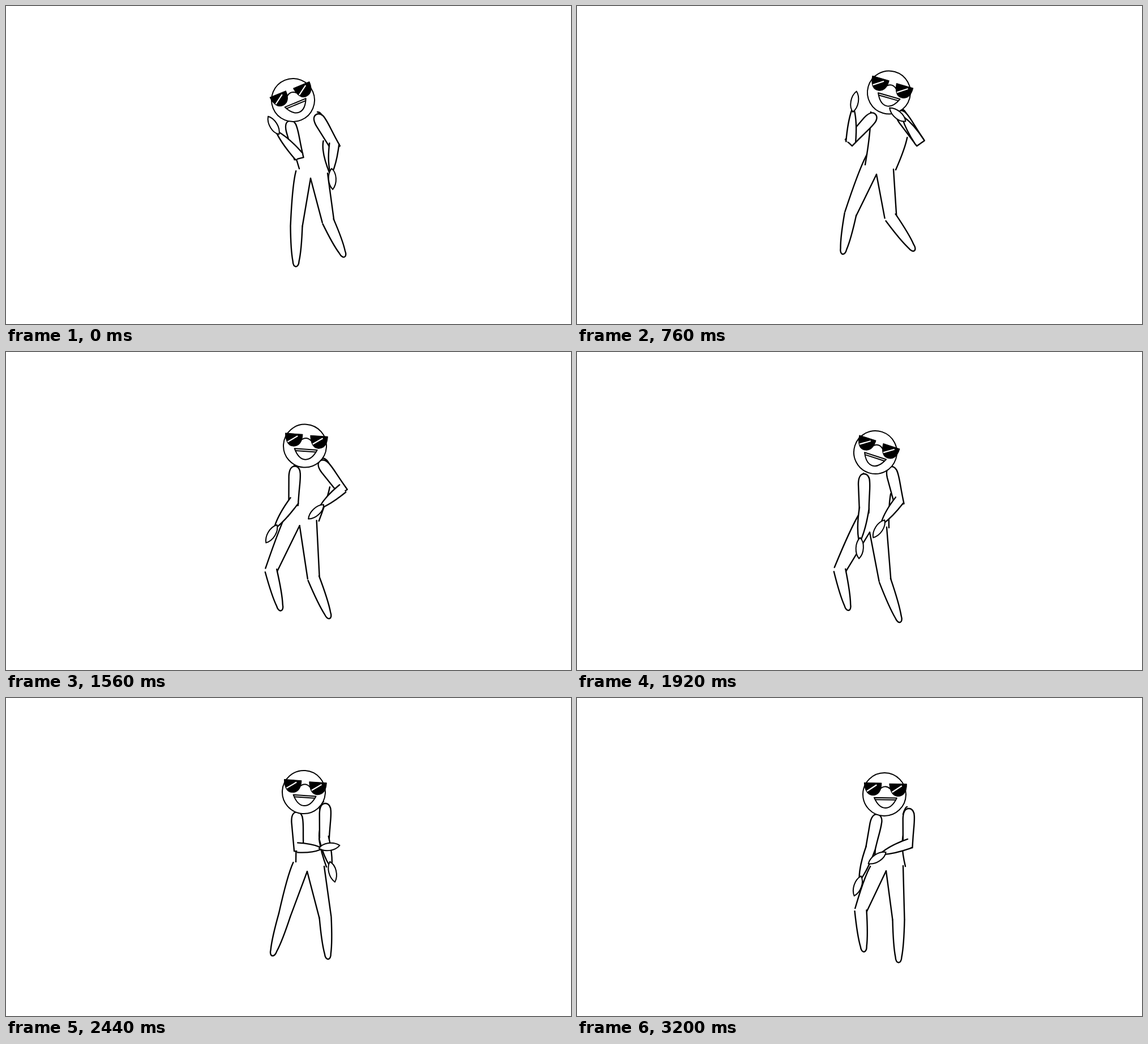
Write an HTML page that moves like this. It is 998 px wide and 561 px high and loops after 3.24 s.

```html
<!DOCTYPE html>
<html lang="en">
<head>
<meta charset="utf-8">
<title>Dancing figure</title>
<style>
  html, body { margin: 0; width: 100%; height: 100%; overflow: hidden; background: #fff; }
  svg { display: block; width: 100vw; height: 100vh; }
  path, circle { stroke: #000; stroke-width: 2.4; stroke-linejoin: round; stroke-linecap: round; fill: #fff; }
  .open { fill: none; }
  .thin { stroke-width: 2; }
  .lens { fill: #000; stroke-width: 1; }
  .shine { stroke: #fff; stroke-width: 2.2; fill: none; stroke-linecap: butt; }
</style>
</head>
<body>
<svg id="stage" viewBox="0 0 998 561"></svg>
<script>
const LOOP = 3240, STEP = 40;
const BEATS = [0, 320, 760, 1200, 1920, 2440, 3200];
const stage = document.getElementById('stage');

// Monotone cubic through one value per beat, plus optional in-between keys.
function track(values, extra = {}) {
  const keys = values.map((v, i) => [BEATS[i], v])
    .concat(Object.entries(extra).map(([t, v]) => [+t, v]))
    .sort((a, b) => a[0] - b[0]);
  const rise = i => (keys[i + 1][1] - keys[i][1]) / (keys[i + 1][0] - keys[i][0]);
  const slope = keys.map((_, i) => {
    if (i === 0 || i === keys.length - 1) return 0;
    const a = rise(i - 1), b = rise(i);
    return a * b > 0 ? 2 * a * b / (a + b) : 0;
  });
  return t => {
    let i = 0;
    while (i < keys.length - 2 && t >= keys[i + 1][0]) i++;
    const span = keys[i + 1][0] - keys[i][0];
    const u = (t - keys[i][0]) / span, w = 1 - u;
    return w * w * ((1 + 2 * u) * keys[i][1] + u * span * slope[i]) +
           u * u * ((3 - 2 * u) * keys[i + 1][1] - w * span * slope[i + 1]);
  };
}

function point(xs, ys) {
  const x = track(xs), y = track(ys);
  return t => [x(t), y(t)];
}

const bob = track([0, 0, 0, 0, 0, 0, 0], { 440: -3, 1560: -10, 2240: -12 });
const head = point([507, 543, 551, 530, 527, 526, 543], [166, 150, 152.5, 172, 177, 166, 170]);
const headTilt = track([-22.5, 0, 16, -10, 18, 4, 1]);
const crotch = point([538, 530, 529, 522, 517, 532, 546], [304, 289, 297, 312, 318, 306, 305]);
const hipRise = track([13, 28, 35, 32, 35, 16, 8]);

const left = {
  reach: 50, length: 54,
  shoulder: point([503, 521, 520, 515, 507, 514, 529], [212, 197, 198, 214, 225, 211, 215]),
  upper: track([76, 138, 133, 97, 90, 87, 102], { 560: 138, 1000: 145 }),
  fore: track([-132, 25, -86, -208, -262, -358, -251], { 560: -118, 1000: -178 }),
  hand: track([-121.5, 38, -80, -211, -267, -368, -251], { 560: -118, 1000: -178 }),
  stretch: track([1, 1, 1, 1, 1, 0.72, 1]),
  knee: point([513, 503, 483, 475, 464, 492, 501], [388, 371, 367, 386, 385, 383, 375]),
  foot: point([512, 488, 469, 489, 480, 470, 507], [460, 441, 438, 457, 456, 455, 448])
};
const right = {
  reach: 41, length: 48,
  shoulder: point([553, 571, 573, 568, 556, 564, 586], [200, 195, 194, 206, 212, 196, 205]),
  upper: track([60, 44, 55, 70, 77, 92, 92], { 560: 44, 1500: 52, 2200: 62, 2880: 55 }),
  fore: track([96, 196, 236, 154, 127, 76, 160], { 560: 309 }),
  hand: track([87, 247, 220, 152, 123, 76, 147], { 560: 309 }),
  stretch: () => 1,
  knee: point([569, 558, 554, 543, 544, 564, 568], [380, 374, 373, 391, 403, 387, 391]),
  foot: point([598, 556, 596, 573, 571, 569, 568], [443, 443, 432, 457, 477, 461, 467])
};

function add(tag, attrs, parent = stage) {
  const el = document.createElementNS('http://www.w3.org/2000/svg', tag);
  for (const k in attrs) el.setAttribute(k, attrs[k]);
  return parent.appendChild(el);
}
const shape = (d, cls = '', parent = stage) => add('path', { d, class: cls }, parent);

// Back to front.
const torso = shape('', 'open');
for (const side of [left, right]) {
  side.thighPath = shape('', 'open');
  side.shinPath = shape('');
}
for (const side of [left, right])
  side.upperPath = shape('M59 8 L8 10 C-4 10 -10 6 -10 0 C-10 -6 -4 -10 4 -10 C18 -11 24 -9 59 -8.5 Z');
const face = add('g', {});
for (const side of [left, right]) {
  const n = side.length;
  side.forePath = shape(`M-3 -8.5 Q${n * .6} -8 ${n} -2 Q${n + 2} 0 ${n} 2 Q${n * .6} 9 -3 8.5`);
}
for (const side of [left, right])
  side.handPath = shape('M0 0 C8 -9 27 -9 37 0 C28 8 10 9 0 0 Z', 'thin');

add('circle', { r: 38, class: 'thin' }, face);
shape('M-6 -11 Q2 -17 10 -10', 'open thin', face);
for (const [x, y] of [[0, 0], [44.5, 1]]) {
  const lens = add('g', { transform: `translate(${x} ${y})` }, face);
  shape('M-36 -20 H-5.5 C-5 -6 -11 2 -21 2 C-30 2 -35 -7 -36 -20 Z', 'lens', lens);
  shape('M-31 -5 L-14 -16.5', 'shine', lens);
}
shape('M-18 6 H22 C17 17 10 24 2 24 C-6 24 -13 17 -18 6 Z', 'thin', face);
shape('M-16 9.5 H20', 'open thin', face);

const polar = ([x, y], deg, r) => {
  const a = deg * Math.PI / 180;
  return [x + r * Math.cos(a), y + r * Math.sin(a)];
};
const heading = (a, b) => Math.atan2(b[1] - a[1], b[0] - a[0]) * 180 / Math.PI;
const place = (el, [x, y], deg, sx = 1) =>
  el.setAttribute('transform', `translate(${x} ${y}) rotate(${deg}) scale(${sx} 1)`);

function drawArm(side, t, shoulder) {
  const upper = side.upper(t), fore = side.fore(t), stretch = side.stretch(t);
  const elbow = polar(shoulder, upper, 53);
  place(side.upperPath, shoulder, upper);
  place(side.forePath, elbow, fore, stretch);
  place(side.handPath, polar(elbow, fore, side.reach * stretch), side.hand(t));
}

function drawLeg(side, t, fork, sign, rise) {
  const knee = side.knee(t), foot = side.foot(t);
  const hip = [fork[0] + sign * 14, fork[1] - 6];
  const aim = heading(hip, knee);
  const inner = polar(knee, aim + sign * 90, 10.5);
  const outer = polar(knee, aim - sign * 90, 10.5);
  // Local +90 degrees points to screen left for a leg that hangs down.
  const [near, far] = [outer, inner];
  const top = sign < 0 ? [fork[0] - 31 + rise * .4, fork[1] - rise] : [fork[0] + 30, fork[1] - 9];
  const bend = sign < 0 ? 4 : 0;
  const ctrl = [top[0] + (near[0] - top[0]) * .25 - bend, top[1] + (near[1] - top[1]) * .25];
  side.thighPath.setAttribute('d', `M${top} Q${ctrl} ${near} M${fork} L${far}`);

  const n = Math.hypot(foot[0] - knee[0], foot[1] - knee[1]);
  side.shinPath.setAttribute('d',
    `M0 -10.5 Q${n * .6} -9.5 ${n - 10} -5.5 C${n + 3} -5 ${n + 3} 5 ${n - 10} 5.5 Q${n * .6} 9.5 0 10.5`);
  place(side.shinPath, knee, heading(knee, foot));
}

function draw(t) {
  const dy = bob(t), raise = ([x, y]) => [x, y + dy];
  const fork = raise(crotch(t)), l = raise(left.shoulder(t)), r = raise(right.shoulder(t));
  const bulge = 13 - (right.upper(t) - 50) * .55;
  torso.setAttribute('d',
    `M${l[0] - 1} ${l[1] - 11} Q${l[0] - 1} ${l[1] + 25} ${fork[0] - 20} ${fork[1] - 17}` +
    `M${r[0] - 3} ${r[1] - 13} Q${r[0] + bulge * .6} ${r[1] - 13} ${r[0] + bulge} ${r[1]}` +
    `M${r[0] + bulge} ${r[1] + 38} Q${r[0] + bulge - 4} ${r[1] + 58} ${fork[0] + 34} ${fork[1] - 8}`);
  drawLeg(left, t, fork, -1, hipRise(t));
  drawLeg(right, t, fork, 1, 0);
  drawArm(left, t, l);
  drawArm(right, t, r);
  place(face, raise(head(t)), headTilt(t));
}

const start = performance.now();
function tick() {
  const t = (performance.now() - start) % LOOP;
  draw(Math.floor(t / STEP) * STEP);
  requestAnimationFrame(tick);
}
tick();
</script>
</body>
</html>
```
